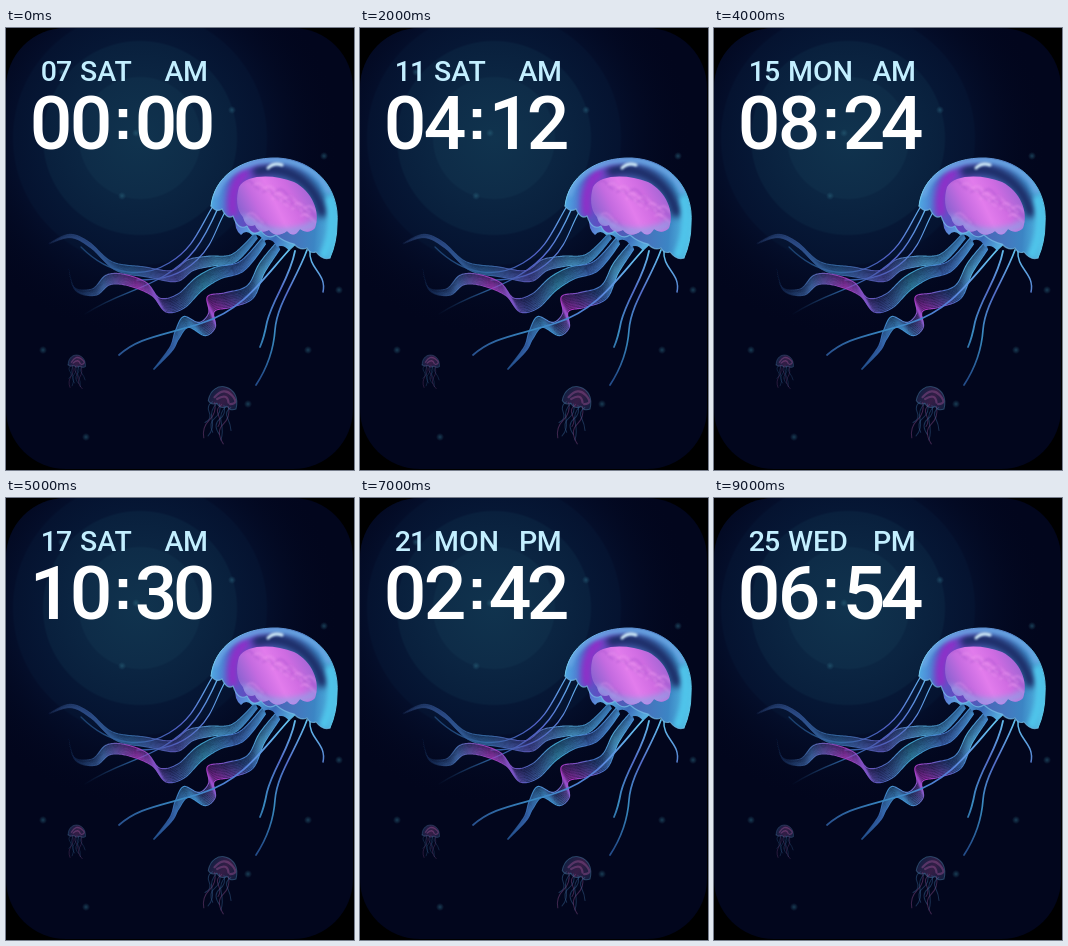
These frames come from a looping animation (348x442 px, 10 s). An HTML page with a canvas:

```html
<!DOCTYPE html>
<html lang="en">
<head>
<meta charset="utf-8">
<title>Jellyfish watch face</title>
<style>
  html, body { margin: 0; width: 100%; height: 100%; overflow: hidden; background: #000; }
  canvas, svg { position: absolute; left: 0; top: 0; width: 348px; height: 442px; }
  text { font-family: Roboto, sans-serif; font-weight: 500; }
  .label { font-size: 28.5px; fill: #c3efff; }
  .clock { font-size: 75px; fill: #fff; text-anchor: middle; }
  .colon { font: bold 60px "Liberation Sans", sans-serif; fill: #fff; text-anchor: middle; }
</style>
</head>
<body>
<canvas id="sea" width="348" height="442"></canvas>
<svg viewBox="0 0 348 442">
  <text id="day" class="label" x="50" y="53" text-anchor="middle" letter-spacing="-1"></text>
  <text id="weekday" class="label" x="74" y="53"></text>
  <text id="half" class="label" x="180" y="53" text-anchor="middle" letter-spacing="-.5"></text>
  <text id="clock" class="clock" x="45 85 150 188" y="121"></text>
  <text class="colon" x="117" y="111">:</text>
</svg>
<script>
const ctx = document.getElementById('sea').getContext('2d');

function gradient(x0, y0, x1, y1, colors) {
  const g = ctx.createLinearGradient(x0, y0, x1, y1);
  colors.forEach((c, i) => g.addColorStop(i / (colors.length - 1), c));
  return g;
}

function stroke(path, color, width, blur = 0) {
  ctx.filter = blur ? `blur(${blur}px)` : 'none';
  ctx.strokeStyle = color;
  ctx.lineWidth = width;
  ctx.stroke(new Path2D(path));
  ctx.filter = 'none';
}

function drawSea() {
  ctx.beginPath();
  ctx.roundRect(0, 0, 347, 441, 60);
  ctx.clip();
  ctx.fillStyle = '#02061d';
  ctx.fillRect(0, 0, 348, 442);

  const glow = ctx.createRadialGradient(134, 110, 0, 134, 110, 200);
  [[0, '#10334e'], [.3, '#0e2c48'], [.31, '#0b2542'], [.48, '#09203d'],
   [.49, '#061735'], [.63, '#051330'], [.64, '#040e2a'], [1, '#02061d00']]
    .forEach(([at, color]) => glow.addColorStop(at, color));
  ctx.fillStyle = glow;
  ctx.fillRect(0, 0, 348, 442);

  const specks = [[56, 44], [318, 128], [116, 168], [37, 322], [302, 322], [80, 409],
                  [226, 82], [333, 262], [130, 105], [242, 376]];
  for (const [x, y] of specks) {
    const g = ctx.createRadialGradient(x, y, 0, x, y, 4);
    g.addColorStop(0, '#28617a99');
    g.addColorStop(1, '#28617a00');
    ctx.fillStyle = g;
    ctx.fillRect(x - 4, y - 4, 8, 8);
  }
}

// Samples a Catmull-Rom spline as {x, y, t}
function spline(points, steps = 20) {
  const at = i => points[Math.max(0, Math.min(points.length - 1, i))];
  const out = [], spans = points.length - 1;
  for (let k = 0; k <= spans * steps; k++) {
    const i = Math.min(spans - 1, Math.floor(k / steps)), u = k / steps - i;
    const [a, b, c, d] = [at(i - 1), at(i), at(i + 1), at(i + 2)];
    const [x, y] = [0, 1].map(j => b[j] + .5 * u * (c[j] - a[j] +
      u * (2 * a[j] - 5 * b[j] + 4 * c[j] - d[j] + u * (3 * (b[j] - c[j]) + d[j] - a[j]))));
    out.push({ x, y, t: k / (spans * steps) });
  }
  return out;
}

// A translucent band swept along a slanted direction, so that it folds at its bends
function ribbon(points, width, colors) {
  const line = spline(points), strands = 10;
  ctx.strokeStyle = gradient(...points[0], ...points[points.length - 1], colors);
  for (let k = 0; k <= strands; k++) {
    const edge = k % strands === 0;
    ctx.globalAlpha = edge ? .9 : .3 + .035 * k;
    ctx.lineWidth = edge ? 1.2 : 1.5;
    ctx.beginPath();
    for (const { x, y, t } of line) {
      const offset = width * (k / strands - .5) * Math.sin(Math.PI * (.15 + .85 * t));
      ctx.lineTo(x + .45 * offset, y + offset);
    }
    ctx.stroke();
  }
  ctx.globalAlpha = 1;
}

function drawArms() {
  ctx.lineCap = ctx.lineJoin = 'round';
  const left = gradient(215, 180, 75, 285, ['#63b6ef', '#5361c8', '#2c609b', '#173b6600']);
  stroke('M207 178C193 201 188 220 163 235S105 249 75 219', left, 1.3);
  stroke('M212 180C196 216 185 232 158 248S110 266 79 286', left, 1.4);
  stroke('M219 184C209 202 207 217 191 232S158 252 131 252', left, 1.2);

  ribbon([[250, 208], [228, 230], [205, 233], [185, 237], [168, 248], [140, 244], [108, 238], [84, 217], [64, 208], [42, 216]],
    11, ['#3f86c8', '#4fa5d6', '#5a58b8', '#356ca6', '#2c4c88', '#29427300']);
  ribbon([[258, 213], [236, 238], [212, 245], [193, 256], [175, 273], [157, 277], [143, 261], [120, 252], [102, 252], [88, 264], [69, 261], [62, 240]],
    14, ['#4b9bdd', '#4a7bd2', '#45b5dc', '#5a68cc', '#b03cc4', '#4a75ba', '#1e437900']);
  ribbon([[272, 218], [256, 240], [244, 264], [222, 272], [205, 276], [206, 292], [196, 301], [180, 294], [171, 307], [165, 321], [148, 341]],
    15, ['#4b94dd', '#57b8e8', '#4a7cd4', '#c13ad4', '#489ddd', '#3766b0', '#275c9e40']);

  stroke('M283 222C256 252 237 282 196 295S133 309 113 327',
    gradient(283, 222, 113, 327, ['#68c8f2', '#567cd8', '#398ac4', '#28508d']), 1.8);
  const right = gradient(290, 220, 253, 350, ['#63c2ef', '#546cc8', '#398bc0', '#244d8a']);
  stroke('M289 223C284 250 267 270 261 294Q258 310 254 319', right, 1.8);
  stroke('M301 222C290 252 271 276 269 302Q267 331 250 357', right, 1.7);
  stroke('M304 222C302 241 321 245 317 264', right, 1.5);
}

function drawBell() {
  ctx.fillStyle = gradient(232, 190, 285, 223, ['#5b68d0', '#5aaee0', '#3b6cba', '#5ab4e2']);
  ctx.fill(new Path2D('M229 188Q228 202 235 207Q240 201 246 207Q253 205 258 213Q266 209 271 219Q278 216 283 223L297 210L280 190Z'));

  const bell = new Path2D('M205 178C208 149 235 129 272 130C309 132 334 160 331 196Q331 214 324 230Q317 233 310 224Q304 226 301 220Q294 223 288 216Q278 214 270 207Q262 212 255 203Q246 209 241 198Q232 203 227 188Q221 192 216 181Q210 185 205 178Z');
  ctx.save();
  ctx.clip(bell);
  ctx.fillStyle = gradient(205, 180, 331, 190,
    ['#4fa8e2', '#4d62c6', '#6a43c0', '#4a62b8', '#4674bd', '#3c85c4', '#55c4e9']);
  ctx.fillRect(200, 125, 135, 110);
  stroke('M238 146Q224 160 227 184', '#8f2fc8', 11, 3);
  stroke('M252 143C281 136 308 154 316 184', '#1c2c66', 11, 3);
  stroke('M209 166C217 142 246 131 272 132C296 133 314 145 323 163', '#6aa6e4', 6, 2);
  stroke('M324 172C328 192 326 210 318 226', '#4fc4ea', 8, 2);
  stroke('M262 140Q268 134 276 137', '#d4effc', 3, 1);

  const body = new Path2D('M233 159C240 146 268 146 288 154C306 163 315 184 309 200Q302 207 294 201Q288 211 281 203Q270 211 263 202Q253 207 249 197Q240 201 237 189C230 182 230 169 233 159Z');
  ctx.fillStyle = gradient(238, 190, 300, 160, ['#8f63d2', '#c46be0', '#e27cec', '#cf6ce2', '#a766d6']);
  ctx.fill(body);
  ctx.clip(body);
  for (let i = 0; i < 17; i++) {
    const x = 237 + i * 29 % 67, y = 154 + i * 17 % 41;
    stroke(`M${x} ${y}q5 -4 9 1t7 6`, i % 3 ? '#ee9cf066' : '#a04ecb66', 2, 1);
  }
  stroke('M237 190Q258 204 276 204T309 196', '#8fa0e6', 6, 3);
  ctx.restore();
  stroke('M205 178C208 149 235 129 272 130C309 132 334 160 331 196Q331 214 324 230',
    gradient(205, 178, 331, 196, ['#75caef', '#659fdc', '#4f7dc0', '#5ac5e6']), 1);
  stroke('M205 178Q210 185 216 181Q221 192 227 188Q232 203 241 198Q246 209 255 203Q262 212 270 207Q278 214 288 216Q294 223 301 220Q304 226 310 224Q317 233 324 230', '#7cc4ecaa', 1.2);
}

function drawSmallJelly(x, y, size, tilt) {
  ctx.save();
  ctx.translate(x, y);
  ctx.rotate(tilt);
  ctx.scale(size, size);
  ctx.globalAlpha = .5;
  const dome = 'M-14 8C-17 -15 14 -17 15 8Q10 12 6 8Q0 13 -5 8Q-10 12 -14 8Z';
  ctx.fillStyle = gradient(-14, 0, 15, 8, ['#253866', '#66356f', '#20355f']);
  ctx.fill(new Path2D(dome));
  stroke(dome, '#467ba2', 1);
  stroke('M-9 3Q-3 -10 7 -4T8 5M-6 4Q2 -5 6 4', '#8a4a88', 2.2);
  for (let i = -4; i <= 4; i++) {
    const reach = 22 + (i * i * 7) % 16;
    stroke(`M${i * 2.4} 8q${i % 2 ? 5 : -5} ${reach / 4} 0 ${reach / 2}t${i + 3} ${reach / 2}`,
      i % 3 ? '#345f8c' : '#7c477f', 1);
  }
  ctx.restore();
}

drawSea();
drawArms();
drawBell();
drawSmallJelly(71, 333, .6, .1);
drawSmallJelly(218, 369, 1, .3);

const weekdays = ['SUN', 'MON', 'TUE', 'WED', 'THU', 'FRI', 'SAT'];
const pad = n => String(n).padStart(2, '0');
const show = (id, text) => { document.getElementById(id).textContent = text; };
let shown = -1;

// Each second jumps one month, two days, two hours and six minutes ahead
function tick() {
  const step = Math.floor(performance.now() % 10000 / 1000);
  if (step !== shown) {
    shown = step;
    const date = new Date(2023, step, 7 + 2 * step, 2 * step, 6 * step);
    const hour = date.getHours();
    show('day', pad(date.getDate()));
    show('weekday', weekdays[date.getDay()]);
    show('half', hour < 12 ? 'AM' : 'PM');
    show('clock', pad(hour % 12) + pad(date.getMinutes()));
  }
  requestAnimationFrame(tick);
}
tick();
</script>
</body>
</html>
```
